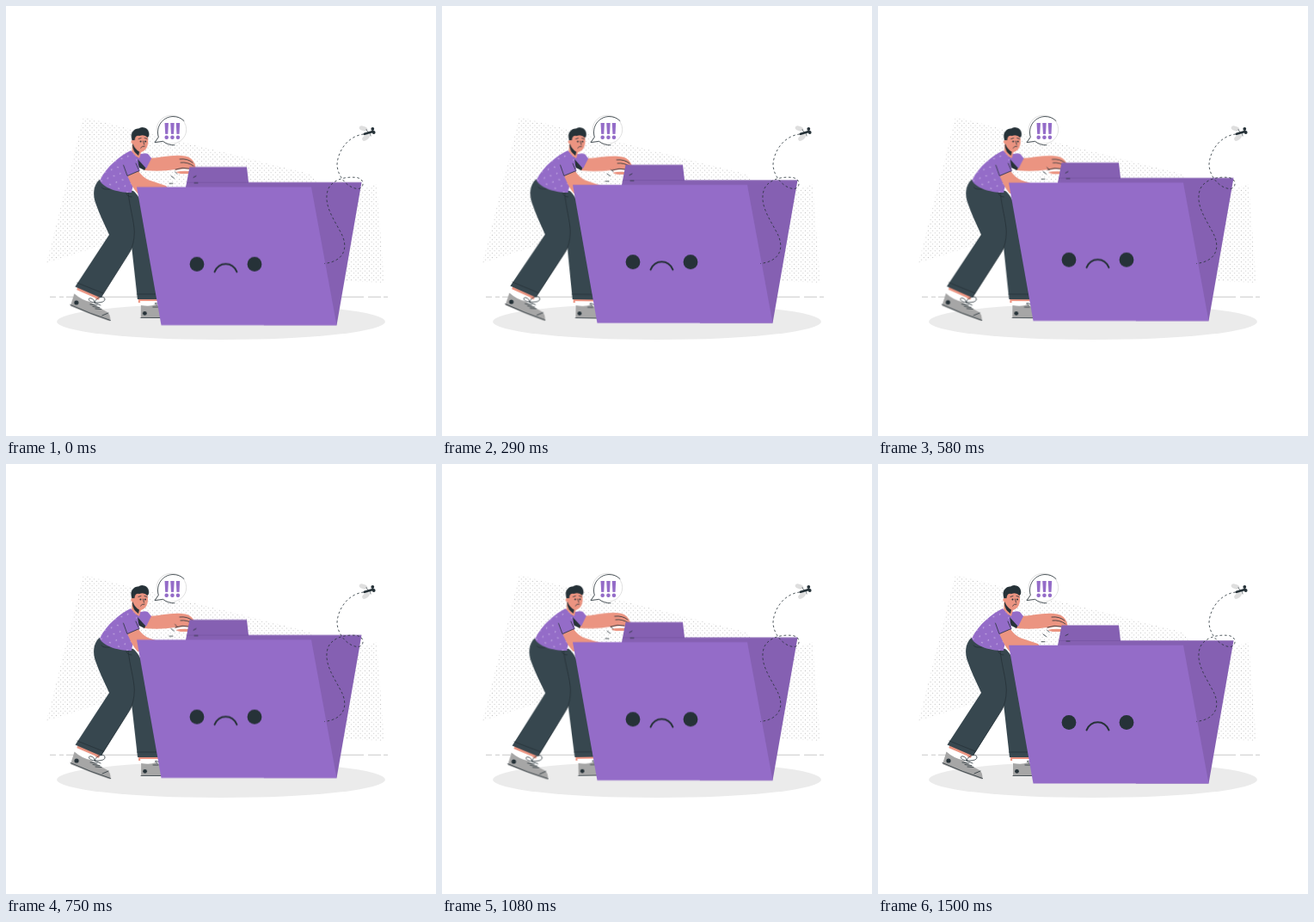
An HTML page for the animation above (1.54 s loop, 500 by 500 pixels).

```html
<!DOCTYPE html>
<html lang="en">
<head>
<meta charset="utf-8">
<title>Pushing a folder</title>
<style>
  html, body { margin: 0; width: 100%; height: 100%; overflow: hidden; background: #fff; }
  svg { display: block; width: 100vw; height: 100vh; }
  .man, .folder { animation: 1540ms linear -40ms infinite; }
  .man { animation-name: sway; transform-origin: 147px 254px; }
  .folder { animation-name: lift; }
  @keyframes sway {
    0%, 100% { transform: rotate(0deg); }
    25% { transform: rotate(1deg); }
    75% { transform: rotate(-1deg); }
  }
  @keyframes lift {
    0%, 100% { transform: translateY(0); }
    50% { transform: translateY(-6.67px); }
  }
  .purple { fill: #946cc8; }
  .shade { fill: #8560b2; }
  .skin { fill: #eb9481; }
  .cloth { fill: #37474f; }
  .ink { fill: #263238; }
  .shoe { fill: #a6a6a6; }
  .white { fill: #fff; }
  .line { fill: none; stroke: #263238; stroke-width: .8; stroke-linecap: round; stroke-linejoin: round; }
  .marks { font: 700 26px "Open Sans", "Noto Sans", sans-serif; letter-spacing: -.8px; text-anchor: middle; }
</style>
</head>
<body>
<svg viewBox="0 0 500 500">
  <defs>
    <pattern id="dots" width="5.2" height="5.2" patternUnits="userSpaceOnUse">
      <g fill="#c6c6c6">
        <circle cx="1.3" cy="1.3" r=".62"/>
        <circle cx="3.9" cy="3.9" r=".62"/>
      </g>
    </pattern>
    <pattern id="specks" width="11" height="11" patternUnits="userSpaceOnUse" patternTransform="rotate(24)">
      <g fill="#d9c8ee">
        <circle cx="2.5" cy="3" r=".65"/>
        <circle cx="8" cy="8.5" r=".65"/>
      </g>
    </pattern>
    <path id="torso" d="M145 168C133 174 117 186 109 203C113 211 128 217 146 217C147 208 152 200 155 192L153 177Z"/>
  </defs>

  <!-- backdrop -->
  <path fill="url(#dots)" d="M90 129L352 195L380 224L431 207L440 322L380 319L200 250L47 299Z"/>
  <path fill="none" stroke="#b4b4b4" stroke-width=".7" d="M51 338.3H58M62 338.3H67M70 338.3H416M421 338.3H436M439 338.3H444"/>
  <ellipse cx="250" cy="367" rx="191" ry="21" fill="#ebebeb"/>

  <!-- speech bubble -->
  <path class="white" stroke="#ccc" stroke-width=".6" d="M173 158.6L177.500 152A17.300 16.500 0 1 1 183 157.500Z"/>
  <path class="line" d="M196 161.800Q188 162 182.500 157.300L173 158.600L177.300 152.500C174 140 182 129 194 128.500Q202 128.500 207 133.500"/>
  <text class="marks purple" x="193" y="154.700">!!!</text>

  <g class="man">
    <!-- far leg -->
    <path class="skin" d="M154 340H180V345H154Z"/>
    <path class="white" d="M156 343H180V351H157Z"/>
    <path class="shoe" d="M157 348Q168 350 174 347L190 354V363L157 362Z"/>
    <path class="line" d="M157 362.500H190M171 350L177 350M176 348Q171 345 175 345.500T180 349"/>
    <circle class="ink" cx="161.500" cy="357.300" r="2.400"/>
    <path class="cloth" d="M130 214L148 215C159 224 164 245 170 275L180 341L153 341L145 270Z"/>
    <path class="line" d="M152.500 335H178"/>

    <!-- near leg -->
    <path class="skin" d="M84 325L110 336L108 342L82 331Z"/>
    <path class="white" d="M82 330L104 339.500L101 347L78 338Z"/>
    <path class="shoe" d="M79.500 334.500Q88 342 98 344L107 350L118 356Q122 359 121.500 366.500Q114 365 75 349Z"/>
    <path class="line" d="M75 347.500Q98 358 121.500 365.500" stroke-width="1.100"/>
    <path class="line" d="M98 347L106 348M101 349.500L109 350.500M104 352L111 352.500M103 345C95 344 95 339 99 340S103 345 103 345C106 337 115 337 115 341S108 345 103 345L110 348M112 360L119 357"/>
    <circle class="ink" cx="82" cy="345" r="2.600"/>
    <path class="cloth" d="M108.500 202C101 209 101 220 104 229C109 243 115 255 120 266L80.500 326.500L110.500 339.500C123 320 136 299 145 284Q151 274 149 258C147 242 143 231 142 216Q122 214 108.500 202Z"/>
    <path class="line" d="M142 217C144 235 149 250 149.300 263Q149 277 144 286L111 338M83 322L113 334M111 211Q113 214 121 213M140 218Q141 222 146 222"/>

    <!-- far arm -->
    <path class="skin" d="M164 177C178 177 190 173 204 174Q214 174 218 181Q222 187 219 191L214 195H203Q196 194 197 190Q180 193 160 191Z"/>
    <path class="white" d="M197 191Q205 188 215 190L214 192Q205 191 197 193Z"/>
    <path class="line" d="M202 178Q211 177 217 182M203 182Q211 181 218 186M197 190Q205 187 213 189"/>
    <path class="ink" d="M151 175L165 183L161 191L153 187Z"/>
    <path class="purple" d="M151 174Q160 170 165 172L169 177L163 189L153 178Z"/>

    <!-- head -->
    <path class="skin" d="M147 153L150 149L164 149Q166 157 164.500 162Q163 168 157 170L155 177L146 172Z"/>
    <path class="ink" d="M147.500 160Q149 166 155 169.500L154 174Q147 169 147 162Z"/>
    <path class="ink" d="M146.500 157Q144 148 148 145Q150 142 154 142.500Q157 140 161 141.500Q165 142.500 166 147Q167 151 164.500 153Q161 149 155 151Q150 150 149.500 156Z"/>
    <circle class="skin" cx="147.300" cy="158" r="2.100"/>
    <g class="ink">
      <circle cx="156.500" cy="157.500" r="1"/>
      <circle cx="162" cy="157.500" r="1"/>
    </g>
    <path class="line" d="M154 154.500L157 153.500M161 153.500L164 154.500M159.500 157L160.500 161M156.500 165Q158 162.500 161 163"/>

    <!-- torso and near arm -->
    <use href="#torso" class="purple"/>
    <use href="#torso" fill="url(#specks)"/>
    <path class="skin" d="M141 197L154 192Q158 198 165 202L186 209L193 218H153Q147 212 141 197Z"/>
    <path class="purple" d="M136 182Q146 175 151 178L155.500 191L141 198Z"/>
    <path class="line" d="M136.500 185L141 197.500L155 191.500M151 183L154 190" stroke-width=".6"/>
  </g>

  <g class="folder">
    <path class="shade" d="M209 211L213.500 187.500H280L282 205.200H413.500L384.500 371.500H300Z"/>
    <path fill="none" stroke="#73519e" stroke-width=".6" d="M210.500 205.500H282"/>
    <path class="purple" d="M152 210.700H355L384.500 371.500H180.500Z"/>
    <path class="line" d="M192 198L195.500 200.500M190 206.700H194M196.500 193L199 195.500M218 199.500L221 198M219 206H223"/>
    <circle class="ink" cx="222" cy="300.500" r="8.400"/>
    <circle class="ink" cx="289" cy="300.500" r="8.400"/>
    <path class="line" style="stroke-width:1.900" d="M242.500 309.500Q246.500 300.300 255.500 300.300T268.500 309.500"/>
  </g>

  <!-- fly and its trail -->
  <path class="line" stroke-dasharray="2.700 2.700" style="stroke-linecap:butt" d="M416 149C398 151 386 168 385 184C385 199 399 213 410 212.500C417 211 417 201 408 199.500C396 198 381 201 375 212C368 229 380 246 388 261C400 281 393 297 370 299.500"/>
  <g fill="#dedede">
    <ellipse cx="415.500" cy="142.500" rx="5" ry="2.700" transform="rotate(18 415.500 142.500)"/>
    <ellipse cx="418.500" cy="153" rx="5" ry="2.700" transform="rotate(-38 418.500 153)"/>
  </g>
  <path class="line" style="stroke-width:2.600" d="M417 148.800L426.500 146"/>
  <circle class="ink" cx="426.300" cy="143" r="1.900"/>
  <circle class="ink" cx="427.700" cy="147" r="1.900"/>
  <path class="line" style="stroke-width:.6" d="M421 147L419 143.500M423 147.500L424 151"/>
</svg>
</body>
</html>
```
